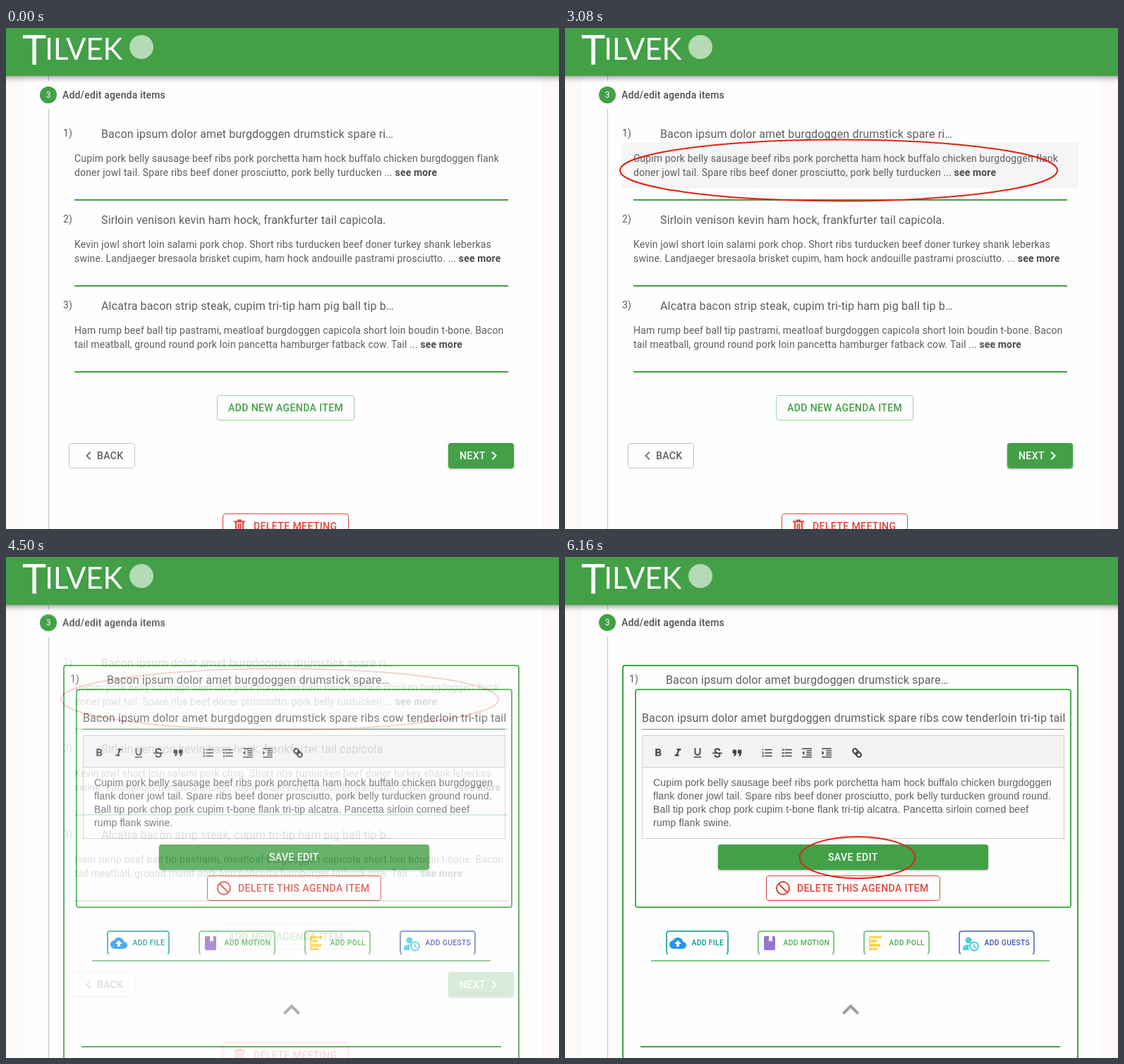
Write an HTML page that moves like this. It is 784 by 711 pixels and loops after 8160 ms.

```html
<!DOCTYPE html>
<html lang="en">
<head>
<meta charset="utf-8">
<title>Agenda items</title>
<style>
html, body { margin: 0; width: 100%; height: 100%; overflow: hidden; background: #fdf9f9; }
svg { display: block; font: 14px Roboto, sans-serif; letter-spacing: .15px; fill: #5e5e5e; }
.title { font-size: 16px; }
.label { font-weight: 500; fill: #505050; }
.num { font-size: 12px; fill: #fff; text-anchor: middle; letter-spacing: 0; }
.more { font-weight: 700; fill: #4c4c4c; }
.btn { font-weight: 500; letter-spacing: .4px; }
.small { font-size: 10.4px; font-weight: 500; letter-spacing: .297px; }
.edit { font-family: "Liberation Sans", Arial, sans-serif; }
.brand { font: 42px Lato, sans-serif; letter-spacing: 0; fill: #fff; }
.raised { filter: drop-shadow(0 1.5px 1.5px rgba(0,0,0,.3)); }
.bar { filter: drop-shadow(0 2px 4px rgba(0,0,0,.45)); }
.ring { fill: none; stroke: #dc2412; stroke-width: 2; }
</style>
</head>
<body>
<svg id="stage" width="784" height="711" viewBox="0 0 784 711"></svg>
<script>
const GREEN = '#43a047', RED = '#e04338';

const rect = (x, y, w, h, fill, more = '') =>
  `<rect x="${x}" y="${y}" width="${w}" height="${h}" fill="${fill}" ${more}/>`;
const frame = (x, y, w, h, color, line = 1, r = 4) =>
  rect(x + line / 2, y + line / 2, w - line, h - line, 'none',
    `rx="${r - line / 2}" stroke="${color}" stroke-width="${line}"`);
const text = (x, y, str, cls = '', more = '') =>
  `<text x="${x}" y="${y}" class="${cls}" ${more}>${str}</text>`;
const icon = (x, y, d, fill, scale = 1, more = '') =>
  `<path transform="translate(${x} ${y}) scale(${scale}) ${more}" d="${d}" fill="${fill}"/>`;
const solid = (x, y, w, h) => rect(x, y, w, h, GREEN, 'rx="4" class="raised"');
const btn = (x, y, str, fill) => text(x, y, str, 'btn', `fill="${fill}"`);

// Step marker with its connector lines
const step = y =>
  rect(60, 68, 1, 7, '#bdbdbd') + rect(60, y + 20, 1, 620, '#bdbdbd') +
  `<circle cx="60" cy="${y}" r="12" fill="${GREEN}"/>` +
  text(60, y + 4, '3', 'num') + text(80, y + 5, 'Add/edit agenda items', 'label');

const paper = rect(24, 0, 736, 711, '#fefefe');

const items = [
  ['Bacon ipsum dolor amet burgdoggen drumstick spare ri…',
   'Cupim pork belly sausage beef ribs pork porchetta ham hock buffalo chicken burgdoggen flank',
   'doner jowl tail. Spare ribs beef doner prosciutto, pork belly turducken ...'],
  ['Sirloin venison kevin ham hock, frankfurter tail capicola.',
   'Kevin jowl short loin salami pork chop. Short ribs turducken beef doner turkey shank leberkas',
   'swine. Landjaeger bresaola brisket cupim, ham hock andouille pastrami prosciutto. ...'],
  ['Alcatra bacon strip steak, cupim tri-tip ham pig ball tip b…',
   'Ham rump beef ball tip pastrami, meatloaf burgdoggen capicola short loin boudin t-bone. Bacon',
   'tail meatball, ground round pork loin pancetta hamburger fatback cow. Tail ...']
];

const item = ([title, first, second], i) => {
  const y = 122 * i;
  return text(81, y + 154, `${i + 1})`) + text(135, y + 156, title, 'title') +
    text(97, y + 190, first) +
    text(97, y + 210, `${second} <tspan class="more">see more</tspan>`) +
    rect(97, y + 243, 615, 2, GREEN);
};

const trash = `<path d="M323 700.5h16M328 698.5h6M326 701v16h10v-16M329.5 703v14M332.5 703v14"
  fill="none" stroke="${RED}" stroke-width="2"/>`;

const listView = paper + step(95) +
  rect(81, 163, 647, 64, '#f5f5f5', 'id="hover"') +
  items.map(item).join('') +
  frame(299, 521, 195, 36, '#a1cfa3') + btn(315, 544, 'ADD NEW AGENDA ITEM', GREEN) +
  frame(89, 589, 94, 36, '#c4c4c4') + btn(129, 612, 'BACK', '#606060') +
  icon(105, 595, 'M15.41 7.41L14 6l-6 6 6 6 1.41-1.41L10.83 12z', '#757575') +
  solid(627, 589, 93, 36) + btn(643, 612, 'NEXT', '#fff') +
  icon(680, 595, 'M10 6L8.59 7.41 13.17 12l-4.58 4.59L10 18l6-6z', '#fff') +
  frame(307, 689, 179, 36, RED) + trash + btn(351, 712, 'DELETE MEETING', RED) +
  '<ellipse id="ring1" class="ring" cx="388" cy="202" rx="310" ry="43.5"/>';

// Toolbar icons on a 24 unit grid: centre x, path
const tools = [
  [132, 'M15.6 10.79c.97-.67 1.65-1.77 1.65-2.79 0-2.26-1.75-4-4-4H7v14h7.04c2.09 0 3.71-1.7 3.71-3.79 0-1.52-.86-2.82-2.15-3.42zM10 6.5h3c.83 0 1.5.67 1.5 1.5s-.67 1.5-1.5 1.5h-3zm3.5 9H10v-3h3.5c.83 0 1.5.67 1.5 1.5s-.67 1.5-1.5 1.5z'],
  [160, 'M10 4v3h2.21l-3.42 8H6v3h8v-3h-2.21l3.42-8H18V4z'],
  [188, 'M12 17c3.31 0 6-2.69 6-6V3h-2.5v8c0 1.93-1.57 3.5-3.5 3.5S8.5 12.93 8.5 11V3H6v8c0 3.31 2.69 6 6 6zm-7 2v2h14v-2z'],
  [244, 'M6 17h3l2-4V7H5v6h3zm8 0h3l2-4V7h-6v6h3z', 1],
  [287, 'M2 17h2v.5H3v1h1v.5H2v1h3v-4H2zm1-9h1V4H2v1h1zm-1 3h1.8L2 13.1v.9h3v-1H3.2L5 10.9V10H2zm5-6v2h14V5zm0 14h14v-2H7zm0-6h14v-2H7z'],
  [315, 'M2.5 4.5h3v3h-3zm0 6h3v3h-3zm0 6h3v3h-3zM7 5v2h14V5zm0 14h14v-2H7zm0-6h14v-2H7z'],
  [343, 'M11 17h10v-2H11zm-8-5l4 4V8zm0 9h18v-2H3zM3 3v2h18V3zm8 6h10V7H11zm0 4h10v-2H11z'],
  [371, 'M3 21h18v-2H3zM3 8v8l4-4zm8 9h10v-2H11zM3 3v2h18V3zm8 6h10V7H11zm0 4h10v-2H11z']
];
const toolbar = tools.map(([x, d, big]) => {
  const s = big ? .9 : .75;
  return icon(x - 12 * s, 278 - 12 * s, d, '#444', s);
}).join('') +
  `<g fill="none" stroke="#444" stroke-width="2">
    <path transform="translate(207 269) scale(.75)" stroke-width="2.6"
      d="M16.5 8c0-5-9-5-9 0 0 2 2 3 4 4M7.5 16c0 5 9 5 9 0 0-1.500-.6-2.300-1.500-3M3 12.500h18"/>
    <g transform="translate(414 278) rotate(45)">
      <rect x="-7" y="-3" width="8" height="6" rx="3"/><rect x="-1" y="-3" width="8" height="6" rx="3"/>
    </g>
  </g>`;

const edited = [
  'Cupim pork belly sausage beef ribs pork porchetta ham hock buffalo chicken burgdoggen',
  'flank doner jowl tail. Spare ribs beef doner prosciutto, pork belly turducken ground round.',
  'Ball tip pork chop pork cupim t-bone flank tri-tip alcatra. Pancetta sirloin corned beef',
  'rump flank swine.'
].map((line, i) => text(125, 325 + 19 * i, line, 'edit')).join('');

// Tab with an open bottom edge
const tab = (x, w, color, ink, str) =>
  `<path d="M${x + 3} 563.5q-2-1-2-4V535q0-4 4-4h${w - 10}q4 0 4 4v24.500q0 3-2 4"
    fill="none" stroke="${color}" stroke-width="2"/>` +
  text(x + 36.500, 551, str, 'small', `fill="${ink}"`);

const tabs =
  tab(143, 89, '#40b0a5', '#009688', 'ADD FILE') +
  tab(273, 109, '#81c784', '#4caf50', 'ADD MOTION') +
  tab(423, 94, '#81c784', '#4caf50', 'ADD POLL') +
  tab(558, 108, '#7986cb', '#3f51b5', 'ADD GUESTS') +
  icon(148, 536, 'M19.35 10.04C18.67 6.59 15.64 4 12 4 9.11 4 6.6 5.64 5.35 8.04 2.34 8.36 0 10.91 0 14c0 3.31 2.69 6 6 6h13c2.76 0 5-2.24 5-5 0-2.64-2.05-4.78-4.65-4.96zM14 13v4h-4v-4H7l5-5 5 5z', '#2196f3') +
  icon(278, 536, 'M6 2h5v8l2.500-1.500L16 10V2h2q2 0 2 2v16q0 2-2 2H6q-2 0-2-2V4q0-2 2-2z', '#9575cd') +
  icon(431, 538, 'M0 0h18v3H2v2h9v4H2v2h14v4H2v2h10v3H0z', '#ffd54f') +
  `<circle cx="572" cy="544" r="4.5" fill="#4dd0e1"/>
  <path d="M564 558v-3c0-3 4-5 9-5q-2 4 0 8z" fill="#4dd0e1"/>
  <circle cx="580" cy="552.5" r="6" fill="#fefefe" stroke="#4dd0e1" stroke-width="2"/>
  <path d="M580 549v4l3 2" fill="none" stroke="#4dd0e1" stroke-width="1.5"/>`;

const editView = paper + step(93) +
  frame(81, 153, 647, 600, GREEN, 2) +
  text(91, 178, '1)') +
  text(143, 180, 'Bacon ipsum dolor amet burgdoggen drumstick spare…', 'title') +
  frame(99, 187, 619, 311, '#4caf50', 2) +
  '<clipPath id="field"><path d="M109 210h600v30H109z"/></clipPath>' +
  text(109, 234, 'Bacon ipsum dolor amet burgdoggen drumstick spare ribs cow tenderloin tri-tip tail',
    'title', 'clip-path="url(#field)"') +
  rect(109, 244, 599, 1, '#8e8e8e') +
  rect(109, 253, 599, 46, '#f3f3f3') +
  frame(109, 253, 599, 147, '#ccc', 1, .5) + rect(109, 298, 599, 1, '#ccc') +
  toolbar + edited +
  solid(217, 408, 383, 36) + btn(373, 431, 'SAVE EDIT', '#fff') +
  frame(285, 452, 247, 36, RED) + btn(329, 475, 'DELETE THIS AGENDA ITEM', RED) +
  `<path d="M302.500 463.500l13 13M300 470a9 9 0 1 1 18 0a9 9 0 1 1-18 0"
    fill="none" stroke="${RED}" stroke-width="2"/>` +
  tabs + rect(122, 572, 565, 2, '#81c784') +
  icon(381, 618.6, 'M12 8l-6 6 1.41 1.41L12 10.83l4.59 4.58L18 14z', '#9e9e9e', 2) +
  rect(107, 694, 595, 2, GREEN) +
  '<ellipse id="ring2" class="ring" cx="414.5" cy="426.5" rx="82" ry="29.5"/>';

const header = rect(-20, -20, 824, 88, GREEN, 'class="bar"') +
  text(23, 52, 'T<tspan dy="-7" dx="-2" font-size="42">ILVEK</tspan>', 'brand', 'style="font-size:58px"') +
  '<circle cx="192" cy="27" r="17" fill="#b4dab6"/>';

stage.innerHTML = `<g>${listView}</g><g id="editor">${editView}</g>${header}`;

// Each fade takes ten steps of 60 ms, the first at its start time
const fades = [['hover', 1000], ['ring1', 2540], ['editor', 4080], ['ring2', 5620]]
  .map(([id, start]) => [document.getElementById(id), start]);

function draw(now) {
  const t = now % 8160;
  for (const [el, start] of fades) {
    const k = Math.floor((t - start) / 60) + 1;
    el.style.opacity = Math.min(1, Math.max(0, k / 10));
  }
  requestAnimationFrame(draw);
}
draw(performance.now());
</script>
</body>
</html>
```
